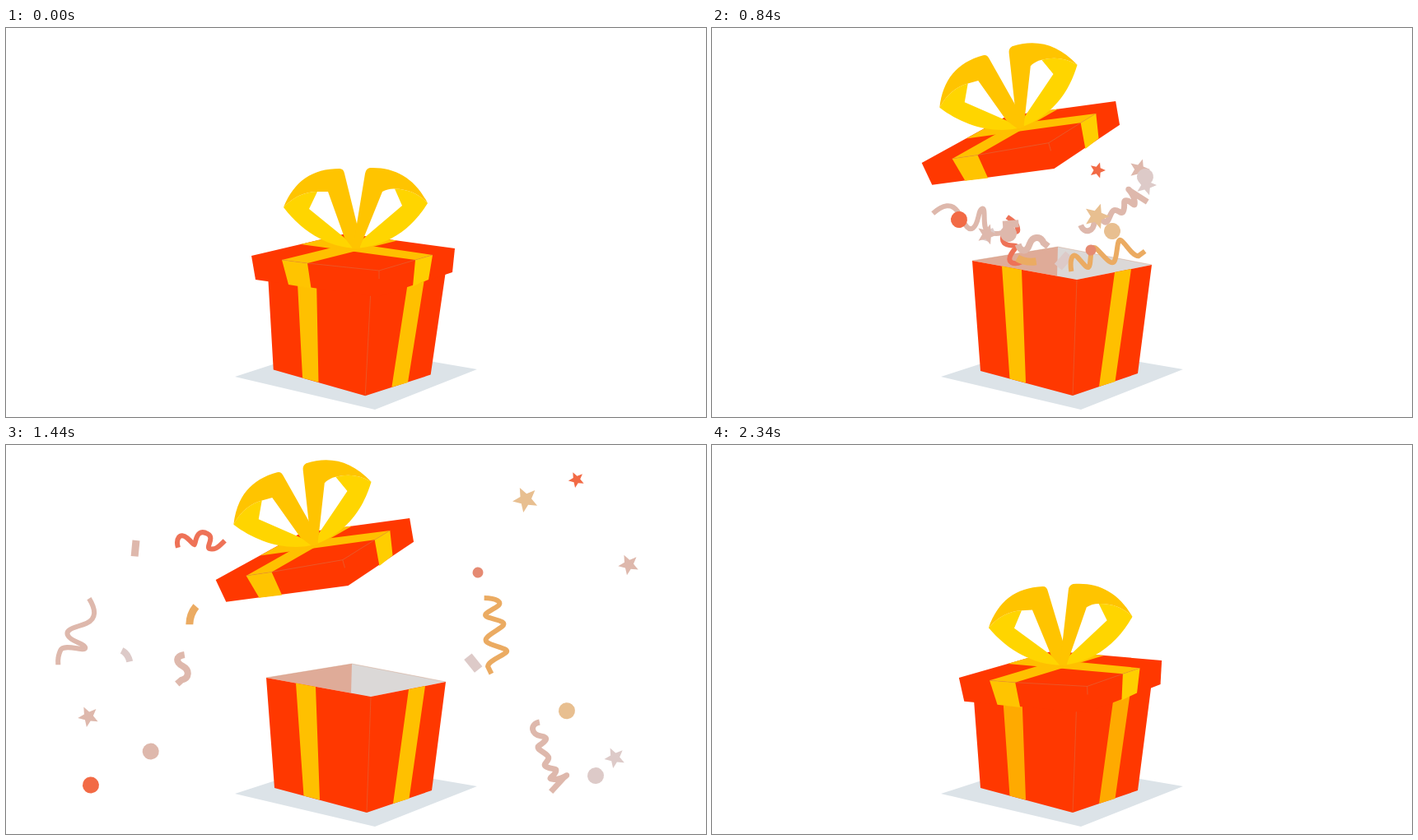
Recreate the animation shown at these times as an HTML page. Size 850 by 473 pixels, loop 2760 ms.

```html
<!DOCTYPE html>
<html lang="en">
<head>
<meta charset="utf-8">
<title>Gift box</title>
<style>
  html, body { margin: 0; width: 100%; height: 100%; overflow: hidden; background: #fff; }
  svg { display: block; width: 100vw; height: 100vh; }
  .red { fill: #ff3800; }
  .band { fill: #ffc000; }
  .dark { fill: #ffc400; }
  .light { fill: #ffd500; }
  .edge { fill: none; stroke: #c98a6a; stroke-width: .7; opacity: .5; }
</style>
</head>
<body>
<svg viewBox="0 0 850 473">
  <path fill="#dce3e8" d="M278 424 448 464 572 415 398 385z"/>
  <g id="gift">
    <path fill="#dfab98" d="M316 283 420 266V303L443 306z"/>
    <path fill="#dbd8d7" d="M420 266 534 288 443 306 419 302z"/>
    <path class="edge" d="M316 283 420 266 534 288"/>
    <g id="confetti"></g>
    <path class="red" d="M316 283 443 306 534 288 517 420 438 447 326 417z"/>
    <path class="edge" d="M443 306 438 447"/>
    <path class="band" id="ribbon" d="M352 289.500 376 294 381 431.500 361.500 426.500zM489 297 509 293 489.500 430 470 436z"/>
    <g id="lid">
      <path class="red" d="M298 277 413 250 545 268 542 297 451 327 303 306z"/>
      <path class="band" d="M335 282 447 254.500 475 258.500 366 286z"/>
      <path class="band" d="M358 263 385 256.500 518 276 497 282z"/>
      <path class="dark" d="M335 282 366 286 370.500 316.500 343 312z"/>
      <path fill="#ffce00" d="M497 282 518 276 513 306 494 314z"/>
      <path class="edge" d="M335 282 366 286 453 295 497 282 518 276M453 295V305"/>
      <path class="light" d="M337 218Q355 199 378 199L368 220 411 255 426 268C390 267 358 246 337 218z"/>
      <path class="light" d="M512 213Q496 196 472 195.500L481 216 434 256 425 268C466 265 494 242 512 213z"/>
      <path class="dark" d="M337 218C350 186 372 171 405 171Q410 171 411 177L426 238 430 268H421L411 255 391 199H378Q355 199 337 218z"/>
      <path class="dark" d="M512 213C496 182 472 169 442 170Q437 171 436 177L426 238 421 268H429L434 256 457 199Q464 195 472 195.500 496 196 512 213z"/>
    </g>
  </g>
</svg>
<script>
const LOOP = 2760, STEP = 60;
const RED = '#f26a45', TAN = '#e8bf90', PINK = '#deb8ac', GREY = '#ddcac8', GOLD = '#ebab62', CORAL = '#e58a72';
const $ = id => document.getElementById(id);

function starPath(r) {
  const pts = [];
  for (let i = 0; i < 10; i++) {
    const a = i * Math.PI / 5 - Math.PI / 2 + .1, q = i % 2 ? r * .45 : r;
    pts.push((q * Math.cos(a)).toFixed(2) + ' ' + (q * Math.sin(a)).toFixed(2));
  }
  return 'M' + pts.join('L') + 'z';
}
const dotPath = r => `M${-r} 0a${r} ${r} 0 1 0 ${2 * r} 0a${r} ${r} 0 1 0 ${-2 * r} 0z`;

const curls = {
  wave: 'M-15-43C0-38 8-30 2-18S-14 4-6 8 16 2 20 6-4 18-1 28 4 38 8 43',
  zigzag: 'M-33-29C-22-38-12-40-14-32S-24-10-14-14 8-26 6-16-4 10 4 10 30-2 30 4 20 26 24 32L33 36',
  spring: 'M-32-28C-40-18-30-10-20-16S-12-14-14-6 0-6 4-2 2 10 10 8 20 0 22 6 18 20 26 14 36-6 34 4L33 28',
  hook: 'M-15 22C-24 16-26 6-14 6S0 10-4 2-8-12 2-14 10 2 16-2 22-10 23-21',
  ess: 'M-7-16C-14-8-10-2 0-4S16 2 10 10L9 17',
  arc: 'M-2-12Q-2 0 6 10',
  chip: 'M-8-1Q0-3 8 3',
  slip: 'M-6-8 5 8',
  tag: 'M-10-2 10 2'
};

// outline, colour, stroke width (0 = filled), early x y, later x y
const pieces = [
  [curls.hook, '#ee7257', 6, 365, 260, 273, 148],
  [curls.arc, GOLD, 9, 382, 284, 271, 217],
  [curls.wave, PINK, 6, 313, 234, 152, 217],
  [curls.ess, PINK, 8, 389, 265, 264, 256],
  [curls.slip, PINK, 9, 363, 238, 218, 147],
  [curls.chip, GREY, 8, 336, 252, 202, 241],
  [curls.tag, GREY, 12, 427, 283, 540, 257],
  [curls.spring, PINK, 7, 488, 226, 622, 318],
  [curls.zigzag, GOLD, 6, 478, 282, 566, 232],
  [starPath(10), RED, 0, 468, 173, 649, 69],
  [starPath(16), TAN, 0, 467, 229, 599, 103],
  [starPath(13), PINK, 0, 519, 172, 710, 140],
  [starPath(13), GREY, 0, 527, 191, 698, 308],
  [starPath(13), PINK, 0, 334, 251, 169, 292],
  [dotPath(10), RED, 0, 300, 233, 161, 344],
  [dotPath(10), PINK, 0, 360, 250, 230, 321],
  [dotPath(10), TAN, 0, 486, 247, 643, 286],
  [dotPath(10), GREY, 0, 526, 181, 679, 320],
  [dotPath(6.5), CORAL, 0, 460, 270, 551, 177]
].map(([d, color, width, x1, y1, x2, y2]) => {
  const el = document.createElementNS('http://www.w3.org/2000/svg', 'path');
  el.setAttribute('d', d);
  el.setAttribute('fill', width ? 'none' : color);
  if (width) {
    el.setAttribute('stroke', color);
    el.setAttribute('stroke-width', width);
  }
  $('confetti').append(el);
  const dx = x2 - x1, dy = y2 - y1;
  return { el, x: [x1, x2, x2 + dx * (dx > 0 ? .2 : .6)], y: [y1, y2, y2 + dy * .67 + 45] };
});

const clamp = v => Math.min(1, Math.max(0, v));
const smooth = v => v * v * (3 - 2 * v);

// parabola through the values at 840, 1200 and 1620 ms
function curve([a, b, c], t) {
  const s1 = (b - a) / 360, s2 = (c - b) / 420;
  return a + (t - 840) * (s1 + (t - 1200) * (s2 - s1) / 780);
}

function lidPose(t) {
  if (t < 1920) {
    const u = smooth(clamp((t - 540) / 300));
    return [420.4 + u * (54.1 + u * (-144.9 + u * 42.8)), 272.5 - 146 * u, -3.04 - 14.66 * u ** .74];
  }
  const u = 1 - smooth(clamp((t - 1920) / 420)) ** .8;
  return [423 - 50.5 * u ** 2.9, 272.5 - 146 * u, -4.9 - 12.8 * u ** .94];
}

function drawConfetti(t) {
  const on = t >= 660 && t < 1680;
  $('confetti').style.display = on ? '' : 'none';
  if (!on) return;
  const k = clamp((t - 660) / 180), rise = 1 - (1 - k) ** 1.4;
  for (const p of pieces) {
    const x = t < 840 ? 425 + (p.x[0] - 425) * k : curve(p.x, t);
    const y = t < 840 ? 325 + (p.y[0] - 325) * rise : curve(p.y, t);
    p.el.setAttribute('transform', `translate(${x} ${y}) rotate(${(t - 1200) / 6})`);
  }
}

function draw(t) {
  const shake = t < 540 ? .95 * Math.cos(t * Math.PI / 120) : 0;
  $('gift').setAttribute('transform', `rotate(${shake} 422 340)`);
  const [x, y, a] = lidPose(t);
  $('lid').setAttribute('transform', `translate(${x} ${y}) rotate(${a + 2.09}) translate(-421.5 -272.5)`);
  $('ribbon').style.fill = t >= 2340 ? '#ffaa00' : '#ffc000';
  drawConfetti(t);
}

const start = performance.now();
function tick() {
  const t = (performance.now() - start) % LOOP;
  draw(Math.floor(t / STEP) * STEP);
  requestAnimationFrame(tick);
}
tick();
</script>
</body>
</html>
```
